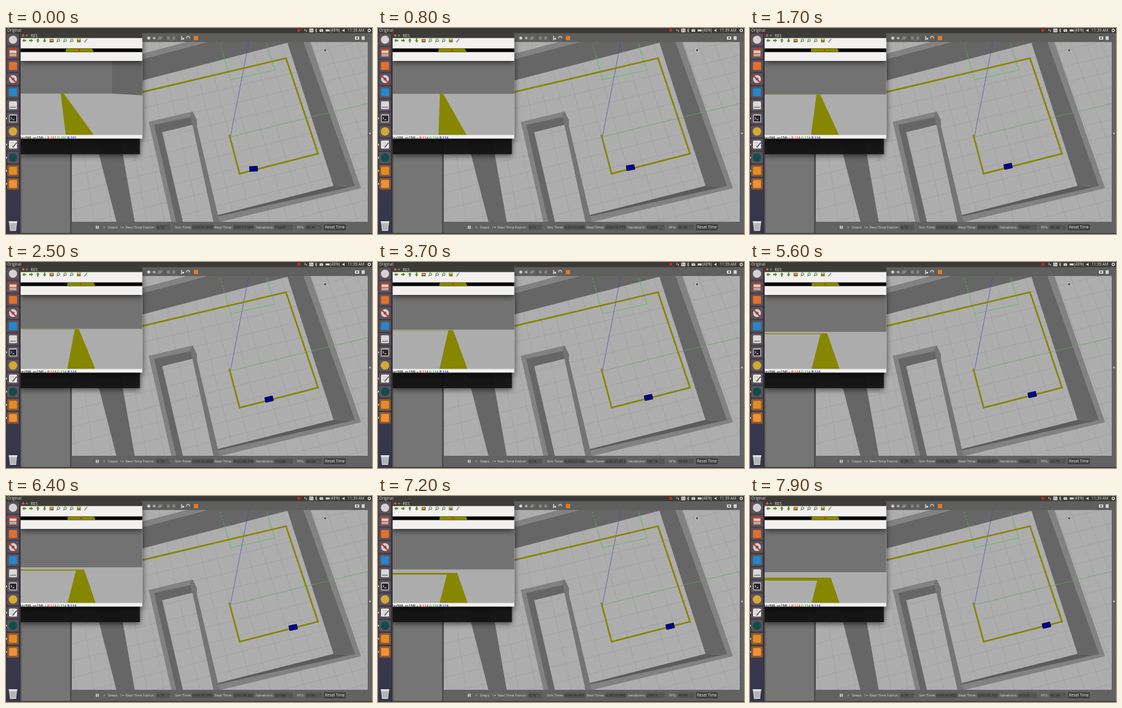
An HTML page with a canvas for the animation above (8000 ms loop, 600 by 338 pixels).

```html
<!DOCTYPE html>
<html lang="en">
<head>
<meta charset="utf-8">
<title>Line follower</title>
<style>
html, body { margin: 0; width: 100%; height: 100%; overflow: hidden; background: #333; }
canvas { display: block; width: 600px; height: 338px; }
</style>
</head>
<body>
<canvas id="stage" width="600" height="338"></canvas>
<script>
const ctx = document.getElementById('stage').getContext('2d');
const LOOP = 8000;
const SANS = '"Open Sans", "Noto Sans", sans-serif';
const YELLOW = '#868600', CHROME = '#626262', PALE = '#cfcfcf', INK = '#dfdbd2';

function rect(x, y, w, h, fill) {
  ctx.fillStyle = fill;
  ctx.fillRect(x, y, w, h);
}

function trace(pts) {
  ctx.beginPath();
  for (let i = 0; i < pts.length; i += 2) ctx.lineTo(pts[i], pts[i + 1]);
}

function poly(fill, ...pts) {
  trace(pts);
  ctx.closePath();
  ctx.fillStyle = fill;
  ctx.fill();
}

function line(color, width, ...pts) {
  trace(pts);
  ctx.strokeStyle = color;
  ctx.lineWidth = width;
  ctx.stroke();
}

function disc(x, y, r, fill) {
  ctx.beginPath();
  ctx.arc(x, y, r, 0, 7);
  ctx.fillStyle = fill;
  ctx.fill();
}

function ring(x, y, r, color, width = 1) {
  ctx.beginPath();
  ctx.arc(x, y, r, 0, 7);
  ctx.strokeStyle = color;
  ctx.lineWidth = width;
  ctx.stroke();
}

function tile(x, y, w, h, r, fill) {
  ctx.beginPath();
  ctx.roundRect(x, y, w, h, r);
  ctx.fillStyle = fill;
  ctx.fill();
}

function text(str, x, y, color, size = 6, weight = 400) {
  ctx.font = `${weight} ${size}px ${SANS}`;
  ctx.fillStyle = color;
  ctx.fillText(str, x, y);
  return x + ctx.measureText(str).width;
}

function fade(y0, y1, from, to) {
  const g = ctx.createLinearGradient(0, y0, 0, y1);
  g.addColorStop(0, from);
  g.addColorStop(1, to);
  return g;
}

function clip(x, y, w, h, draw) {
  ctx.save();
  ctx.beginPath();
  ctx.rect(x, y, w, h);
  ctx.clip();
  draw();
  ctx.restore();
}

function shadowed(draw) {
  ctx.save();
  ctx.shadowColor = 'rgba(0,0,0,.6)';
  ctx.shadowBlur = 9;
  ctx.shadowOffsetY = 3;
  draw();
  ctx.restore();
}

// ---- simulated world ----

function grid() {
  const color = '#9d9d9d';
  for (let i = -14; i < 12; i++) {
    const x = 367 + i * 27, k = 0.27 + (x - 374) * 0.0005;
    line(color, 0.6, x - 160 * k, 18, x + 150 * k, 328);
  }
  for (let i = -9; i < 10; i++) {
    const y = 179 + i * 27, k = 0.245 + i * 0.003;
    line(color, 0.6, 100, y + 267 * k, 600, y - 233 * k);
  }
}

function walls() {
  const face = '#666', top = '#828282';
  // far
  poly(face, 220, 52, 330, 23, 466, 23, 220, 87);
  poly(top, 220, 43, 296, 23, 330, 23, 220, 52);
  // right
  poly(face, 461, 23, 488, 23, 573, 260, 537, 259);
  poly(top, 488, 23, 499, 23, 582, 263, 572, 259);
  // near
  poly('#5c5c5c', 347, 307, 537, 259, 573, 260, 348, 310);
  poly(top, 348, 309, 573, 259, 582, 263, 352, 318, 348, 318);
  // left
  poly(face, 146, 182, 187, 182, 211, 318, 181, 318);
  // inner enclosure
  poly(face, 242, 157, 304, 144, 309, 158, 256, 171, 290, 318, 277, 318);
  poly(top, 234, 154, 306, 137, 308, 145, 243, 159, 279, 318, 271, 318);
  poly('#747474', 302, 142, 306, 137, 313, 151, 313, 161, 350, 318, 340, 318);
}

function robot(t) {
  ctx.save();
  ctx.translate(405.8 + 10.15 * t, 231 - 2.4 * t);
  ctx.rotate(-0.05 - 0.17 * Math.min(1, t / 1.2));
  tile(-7, -4.5, 14, 9, 1, '#05053c');
  rect(-6.5, -3.6, 13, 7.4, '#000086');
  ctx.restore();
}

function scene(t) {
  clip(108, 23, 485, 295, () => {
    rect(108, 23, 485, 295, '#adadad');
    grid();
    walls();
    line('#63ad63', 0.6, 367, 179, 475, 152, 593, 124);
    const green = '#45c845';
    line(green, 0.7, 356, 42, 368.5, 85, 441, 69, 427, 25);
    ctx.setLineDash([3, 3]);
    line(green, 0.7, 351, 26, 356, 42);
    ctx.setLineDash([]);
    line('#4848c4', 0.7, 398, 23, 368, 178);
    line(YELLOW, 2.7, 218, 106.4, 459, 49.5, 511.5, 206, 383, 239, 366, 175);
    robot(t);
  });
}

function toolbar() {
  rect(220, 9, 380, 14, '#5f5f5d');
  disc(234, 16.5, 2.5, PALE);
  for (let i = 0; i < 4; i++) {
    const dx = 2.5 * Math.cos(i * Math.PI / 4), dy = 2.5 * Math.sin(i * Math.PI / 4);
    line(PALE, 0.8, 243 - dx, 16.5 - dy, 243 + dx, 16.5 + dy);
  }
  for (let i = 0; i < 3; i++) line(PALE, 0.7, 249 + i * 2, 19, 252 + i * 2, 14);
  for (const x of [260, 283, 304]) rect(x, 12, 0.7, 9, '#4a4a4a');
  rect(264, 14, 4, 5, '#858585');
  rect(273, 14, 4, 5, '#858585');
  rect(287, 13, 1.5, 7, PALE);
  rect(289, 16, 3, 3, PALE);
  ring(298.5, 16, 2.3, PALE, 1.2);
  rect(296, 17, 5, 2, '#5f5f5d');
  tile(308, 13, 7, 7, 1, '#e8791c');
  rect(572, 14, 7, 5, '#e2e2e2');
  disc(575.5, 16.5, 1.4, '#555');
  rect(583, 13.5, 5, 6, '#d3d3d3');
}

function statusBar(t) {
  rect(108, 318.5, 492, 20, CHROME);
  const steps = Math.round(15428 + 705 * t + 6 * t * t);
  const sim = (35.61 + steps / 1000).toFixed(3);
  const real = (17.989 + 0.98 * t).toFixed(3);
  const factor = (0.72 + 0.005 * t).toFixed(2);
  const fps = (40.1 + 0.35 * Math.cos(0.65 * t)).toFixed(2);
  const y = 329.3;
  const label = (s, x) => text(s, x, y, '#dcdcdc');
  const field = (s, x, w) => {
    rect(x, 322.5, w, 9, '#555');
    text(s, x + 1, y, '#222');
  };
  rect(147.5, 324.5, 1.5, 5, '#eee');
  rect(150.3, 324.5, 1.5, 5, '#eee');
  poly('#8a8a8a', 160, 324.5, 163, 327, 160, 329.5);
  label('Steps:', 167);
  text('1', 187, y, PALE, 5);
  poly(PALE, 191, 326, 193.5, 327.3, 191, 328.6);
  label('Real Time Factor:', 196);
  field(factor, 246.5, 22);
  label('Sim Time:', 277);
  field('0:04:' + sim, 305, 35);
  label('Real Time:', 342);
  field('0:00:' + real, 372.5, 34);
  label('Iterations:', 410);
  field(String(steps), 440, 30);
  label('FPS:', 477);
  field(fps, 491, 27);
  tile(521, 322, 36, 10, 1.5, '#404040');
  text('Reset Time', 523, y, '#eee', 6.3);
}

function simulator(t) {
  rect(23, 8, 577, 330, CHROME);
  tile(26, 180, 79, 156, 2, '#757575');
  rect(105, 180, 2.5, 158, '#4c4c4c');
  scene(t);
  toolbar();
  rect(593, 23, 7, 315, CHROME);
  poly('#ddd', 597.5, 171, 597.5, 175, 595, 173);
  statusBar(t);
}

// ---- robot camera ----

const settle = t => 1 - Math.exp(-0.65 * t);
const footX = t => 121 + 3 * settle(t);

function cameraView(t) {
  const horizon = 101 + 72 / (10.9 - t);
  const top = 99 + 85.6 / (10.35 - t);
  const foot = 175.5;
  const half = y => (y - 99) * 0.3;
  const topX = 92 + 30 * settle(t);
  const corner = 174 + 62 * t;

  shadowed(() => rect(24, 54, 199.5, 127.5, '#f1f0ee'));
  clip(24, 54, 199.5, 121.5, () => {
    rect(24, 54, 200, 122, '#acacac');
    rect(24, 54, 200, horizon - 54, '#727272');
    if (corner < 224) {
      poly('#666', corner, 54, 224, 54, 224, horizon + (224 - corner) * 0.06, corner, horizon);
    }
    poly(YELLOW, topX - half(top), top, topX + half(top), top,
      footX(t) + half(foot), foot, footX(t) - half(foot), foot);
    const band = 0.004 * (top - 99) ** 2;
    if (t > 1) rect(24, top, topX - 24, band, YELLOW);
  });

  const level = t < 0.6 ? 102 : 114;
  clip(23, 175.5, 200, 6, () => {
    const write = (s, x, color) => text(s, x, 182, color, 5.6, 600);
    let x = write('(x=598, y=158) ~ ', 23.5, '#111');
    x = write(`R:${level} `, x, '#e01818');
    x = write(`G:${level} `, x, '#188c18');
    write(`B:${level}`, x, '#1818b8');
  });
}

function maskWindow(t) {
  shadowed(() => rect(24, 16, 199.5, 38, '#f2f1f0'));
  tile(24, 8, 199.5, 8.5, [3, 3, 0, 0], '#3d3c38');
  disc(28.2, 12.3, 2, '#df5a31');
  disc(34.3, 12.3, 1.8, '#76746c');
  text('RES', 40.5, 14.8, INK, 6.6);

  [Math.PI, 0, -Math.PI / 2, Math.PI / 2].forEach((angle, i) => {
    ctx.save();
    ctx.translate(30 + i * 11.1, 20.5);
    ctx.rotate(angle);
    poly('#57901c', -3.2, -1.2, 0, -1.2, 0, -3, 3.4, 0, 0, 3, 0, 1.2, -3.2, 1.2);
    ctx.restore();
  });
  rect(71.5, 18, 6.5, 5.5, '#8c5c23');
  rect(72.5, 19, 4.5, 2, '#d9ad55');
  for (let x = 86; x < 110; x += 11) {
    ring(x, 20, 2, '#55833a', 1.1);
    line('#656565', 1.2, x - 1.4, 21.5, x - 3, 23.5);
  }
  rect(116.3, 17.5, 6.2, 6, '#7c8127');
  rect(117.5, 17.5, 3.8, 2.2, '#e0d59b');
  line('#8d8d88', 1.8, 133, 18, 128.5, 23.5);

  rect(24, 33.5, 199.5, 6, '#050505');
  const x = footX(t);
  poly(YELLOW, x - 22.5, 33.5, x + 20, 33.5, x + 23, 39.5, x - 23.5, 39.5);
  disc(x - 0.8, 36.5, 1.5, '#e3220c');
}

// ---- desktop ----

function launcher() {
  rect(0, 8, 23, 330, fade(8, 338, '#4b3d4a', '#34364c'));
  rect(22.5, 8, 1, 330, '#292629');
  const slot = i => 19.3 + i * 21.5;
  for (let i = 0; i < 12; i++) tile(2, slot(i) - 9.5, 19, 19, 2.5, i < 10 ? '#5b535a' : '#8a5a30');
  const square = (i, fill) => tile(5, slot(i) - 6.5, 13, 13, 1.5, fill);

  disc(11.5, slot(0), 6.7, '#d8d1d4');
  // file drawer
  square(1, '#c74b31');
  rect(6, 37, 11, 4, '#e6cfbf');
  rect(6, 42, 11, 4.5, '#b9aaa4');
  square(2, '#e36f2b');
  // settings
  disc(11.5, slot(3), 6.5, '#d3d0d0');
  disc(11.5, slot(3), 2.4, '#5e5757');
  line('#cc3328', 2.3, 6, 78.5, 17, 90);
  square(4, '#2388cb');
  // drive
  square(5, '#d9d9d7');
  rect(6.5, 129, 10, 2, '#8e8e8c');
  // terminal
  square(6, '#d7d7d3');
  rect(6, 143.5, 11, 10, '#26262b');
  line('#eee', 1, 7.5, 146, 9.5, 148, 7.5, 150);
  line('#eee', 1, 10.5, 150.5, 13.5, 150.5);
  disc(11.5, slot(7), 7, '#d6a933');
  // text editor
  square(8, '#eeede8');
  for (let i = 0; i < 4; i++) rect(7, 187 + i * 2.5, 7, 0.7, '#aaa');
  line('#555', 1.7, 17.5, 188, 11, 196);
  disc(11.5, slot(9), 7, '#124d4c');
  square(10, '#e58b26');
  square(11, '#f29035');

  for (const i of [6, 8, 9, 10, 11]) poly('#ddd', 0, slot(i) - 2, 2, slot(i), 0, slot(i) + 2);

  // trash
  poly('#c9cbc9', 5, 319, 18, 319, 16.5, 333, 6.5, 333);
  rect(4.5, 317, 14, 2.5, '#e2e3e2');
  for (let i = 0; i < 3; i++) rect(8 + i * 3, 321, 1, 10, '#858a87');
}

function panel(t) {
  rect(0, 0, 600, 8.5, '#3b3a36');
  text('Original', 2, 6.4, INK, 6.3);
  disc(480, 3.8, 2.6, '#d22424');
  line(INK, 1, 490, 1.5, 490, 5);
  line(INK, 1, 492.5, 3, 492.5, 6.5);
  tile(497, 1, 7, 6, 1, INK);
  text('En', 498, 5.9, '#3b3a36', 4.5);
  line(INK, 0.7, 506.5, 2.3, 510, 5.5, 508.3, 7, 508.3, 1, 510, 2.5, 506.5, 5.5);
  rect(514, 1.8, 6, 4.3, INK);
  line('#3b3a36', 0.6, 514, 2, 517, 4.2, 520, 2);
  rect(524, 2.4, 6.5, 3.2, INK);
  text('(48%)', 531.5, 6.3, INK, 6.2);
  poly(INK, 551.5, 3, 553, 3, 555, 1.2, 555, 6.8, 553, 5, 551.5, 5);
  text(t < 0.5 ? '11:38 AM' : '11:39 AM', 560, 6.4, INK, 6.3);
  ring(595.5, 4, 2, INK, 1.4);
}

function cursor() {
  poly('#222', 521.5, 33, 521.5, 39.5, 523.5, 38, 526, 37.5);
  line('#fff', 0.6, 521.5, 33, 521.5, 39.5, 523.5, 38, 526, 37.5, 521.5, 33);
}

function draw(ms) {
  const t = Math.floor(ms / 100) / 10;
  simulator(t);
  shadowed(() => rect(24, 180, 195.5, 27, 'rgba(20,20,20,.94)'));
  cameraView(t);
  maskWindow(t);
  launcher();
  panel(t);
  cursor();
  rect(0, 336.5, 600, 1.5, '#3a3a3a');
}

const start = performance.now();
function tick() {
  draw((performance.now() - start) % LOOP);
  requestAnimationFrame(tick);
}
tick();
</script>
</body>
</html>
```
